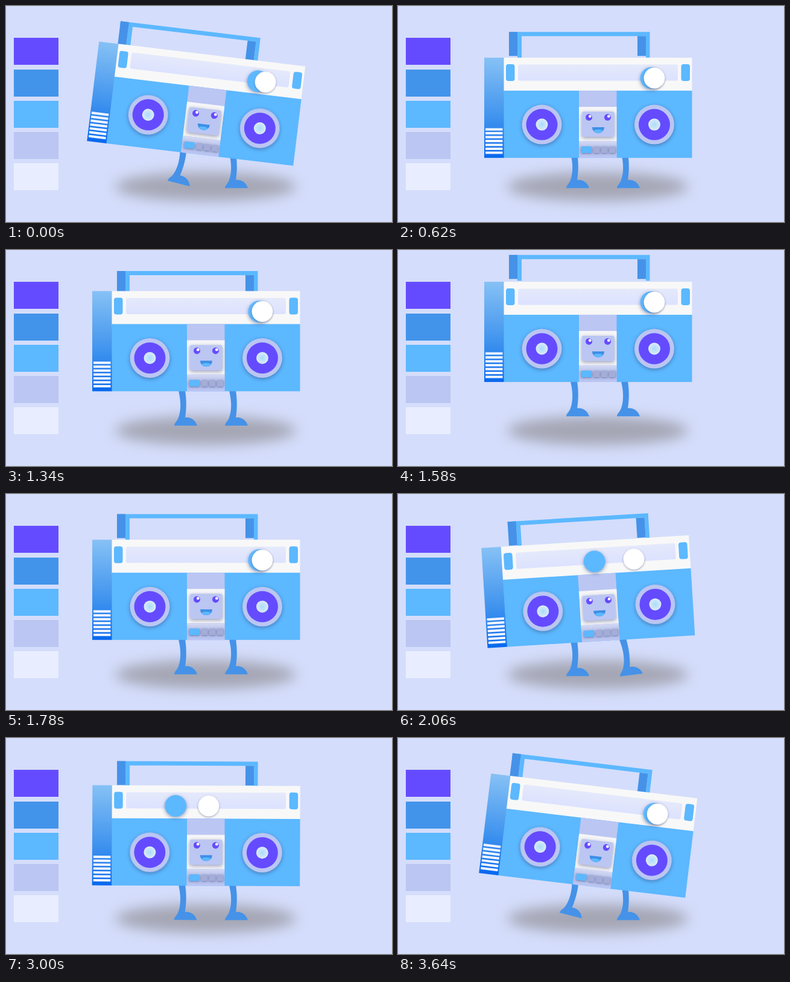
Write an HTML page that moves like this. It is 640 px wide and 360 px high and loops after 3.66 s.

```html
<!DOCTYPE html>
<html lang="en">
<head>
<meta charset="utf-8">
<title>Dancing boombox</title>
<style>
  html, body { margin: 0; width: 100%; height: 100%; overflow: hidden; background: #d4ddfb; }
  svg { display: block; width: 640px; height: 360px; }

  .move {
    animation-duration: 3660ms;
    animation-iteration-count: infinite;
    animation-timing-function: cubic-bezier(.37, 0, .63, 1);
  }
  #body { transform-origin: 315px 169.5px; animation-name: tilt, body-hop; }
  #handle { transform-origin: 301px 86px; animation-name: tilt, handle-hop; }
  #legs { animation-name: jump; }
  #left { transform-origin: 290px 250px; animation-name: left-step; }
  #right { transform-origin: 374px 250px; animation-name: right-step; }
  #blue { animation-name: blue-slide; }
  .white { animation-name: white-slide; }
  #over, #under { animation: swap 3660ms step-end infinite; }
  #under { animation-name: swap-back; }

  @keyframes tilt {
    0%, 1.64%, 88.52%, 100% { rotate: 6.9deg; }
    13.66%, 51.37% { rotate: 0deg; }
    61.2%, 75.14% { rotate: -7deg; }
  }
  @keyframes body-hop {
    0%, 12.3%, 32.24%, 32.79%, 50.55%, 100% { translate: 0 -6.75px; }
    19.67% { translate: 0 3px; }
    41.8% { translate: 0 -34.75px; }
  }
  @keyframes handle-hop {
    0%, 13.39%, 32.79%, 34.43%, 50.55%, 100% { translate: 0 -4px; }
    20.22% { translate: 0 4px; }
    43.72% { translate: 0 -35px; }
  }
  @keyframes jump {
    0%, 32.79%, 50.55%, 100% { translate: 0 0; }
    41.8% { translate: 0 -28px; }
  }
  @keyframes left-step {
    0%, 1.64%, 88.52%, 100% { translate: 1.5px -8px; rotate: 14deg; }
    13.66% { translate: 0 0; rotate: 0deg; }
    81.83% { translate: 0 0; rotate: 0deg; animation-timing-function: cubic-bezier(.39, .575, .565, 1); }
  }
  @keyframes right-step {
    0%, 51.37%, 81.83%, 100% { translate: 0 0; rotate: 0deg; }
    61.2% { translate: -3px -1px; rotate: -14deg; }
    75.14% { translate: -3px -1px; rotate: -14deg; animation-timing-function: cubic-bezier(.47, 0, .745, .715); }
  }
  @keyframes blue-slide {
    0% { translate: -12.4px 0; }
    10.93%, 51.37%, 90.16%, 100% { translate: -5.4px 0; }
    61.2%, 78.14% { translate: -185.5px 0; }
  }
  @keyframes white-slide {
    0%, 53.55%, 87.43%, 100% { translate: 0 0; }
    63.66%, 76.5% { translate: -180px 0; }
  }
  @keyframes swap {
    0%, 82.8%, 100% { opacity: 1; }
    56.5% { opacity: 0; }
  }
  @keyframes swap-back {
    0%, 82.8%, 100% { opacity: 0; }
    56.5% { opacity: 1; }
  }

  .sky { fill: #5cb8ff; }
  .mid { fill: #4592e8; }
  .lilac { fill: #bbc6f3; }
  .violet { fill: #654bff; }
  .raised { filter: drop-shadow(0 2px 3px rgba(40, 50, 100, .45)); }
  .key { filter: drop-shadow(0 1px 1.5px rgba(40, 50, 100, .5)); }
</style>
</head>
<body>
<svg viewBox="0 0 640 360">
  <defs>
    <linearGradient id="side" x2="0" y2="1">
      <stop offset="0" stop-color="#86c1f5"/>
      <stop offset=".6" stop-color="#3f93ee"/>
      <stop offset="1" stop-color="#0768ee"/>
    </linearGradient>
    <linearGradient id="dial" x2="0" y2="1">
      <stop offset="0" stop-color="#e5e9fb"/>
      <stop offset="1" stop-color="#dce2ff"/>
    </linearGradient>
    <linearGradient id="deck" x2="0" y2="1">
      <stop offset="0" stop-color="#d5dbf5"/>
      <stop offset=".5" stop-color="#b0b9e4"/>
      <stop offset="1" stop-color="#bbc6f3"/>
    </linearGradient>
    <radialGradient id="cone">
      <stop offset="0" stop-color="#a9dcfa"/>
      <stop offset="1" stop-color="#dcebf8"/>
    </radialGradient>
    <filter id="blur" x="-20%" y="-120%" width="140%" height="340%">
      <feGaussianBlur stdDeviation="11"/>
    </filter>
    <path id="leg" d="M284 238H296C299 255 300 272 297 290C306 289 314 294 317 303.5H279C279 299 284 296 286 290C291 276 290 258 284 238Z"/>
    <g id="speaker">
      <circle class="lilac raised" r="33"/>
      <circle class="violet" r="26"/>
      <circle r="10" fill="url(#cone)"/>
    </g>
    <g id="eye">
      <circle class="violet" r="5.5"/>
      <circle cx="1.8" cy="-1.8" r="2.4" fill="#fff"/>
    </g>
    <rect id="button" class="key" y="234" width="10.5" height="11" rx="1" fill="#a3add8"/>
    <circle id="cap" class="key" cx="425" cy="120" r="17.5" fill="#fff"/>
  </defs>

  <rect width="640" height="360" fill="#d4ddfb"/>
  <rect class="violet" x="13" y="53" width="74" height="45"/>
  <rect x="13" y="106" width="74" height="45" fill="#4294ea"/>
  <rect class="sky" x="13" y="158" width="74" height="45"/>
  <rect class="lilac" x="13" y="210" width="74" height="45"/>
  <rect x="13" y="262" width="74" height="45" fill="#e8eeff"/>

  <ellipse cx="331" cy="301" rx="150" ry="24" fill="#a4a6b4" filter="url(#blur)"/>

  <g id="legs" class="move mid">
    <g id="left" class="move"><use href="#leg"/></g>
    <g id="right" class="move"><use href="#leg" x="84"/></g>
  </g>

  <g id="handle" class="move">
    <path class="sky" d="M184 43H417.5V86H411V50H205V86H198V50H184Z"/>
    <path class="mid" d="M184 43H198V83H184ZM397 50H411V83H397Z"/>
  </g>

  <g id="body" class="move">
    <rect x="143" y="86" width="33" height="167" fill="url(#side)"/>
    <path d="M145 205.5H173.5" stroke="#eef4ff" stroke-width="4"/>
    <path d="M145 212H173.5M145 218.5H173.5M145 225H173.5M145 231.5H173.5M145 238H173.5M145 244.5H173.5" stroke="#eef4ff" stroke-width="4"/>
    <rect x="175.5" y="86" width="312" height="56" fill="#f8f8f8"/>
    <rect class="sky" x="175.5" y="141" width="312" height="112"/>
    <rect class="sky" x="179" y="97" width="14.5" height="28" rx="4"/>
    <rect class="sky" x="469.5" y="97" width="14.5" height="28" rx="4"/>
    <rect x="199" y="97.5" width="265" height="27" rx="3" fill="url(#dial)"/>

    <use href="#speaker" x="238.5" y="197.5"/>
    <use href="#speaker" x="425" y="197.5"/>

    <rect class="lilac" x="300" y="141" width="62.5" height="112"/>
    <rect x="300" y="168" width="62.5" height="57" fill="#f6f6f8"/>
    <rect x="300" y="225" width="62.5" height="28" fill="url(#deck)"/>
    <rect class="lilac raised" x="305" y="176" width="53.5" height="42" rx="3"/>
    <use href="#eye" x="316.5" y="185.5"/>
    <use href="#eye" x="347.5" y="185.5"/>
    <path d="M322 202H342C342 215 322 215 322 202Z" fill="#3d8fe6"/>
    <path class="sky" d="M324 208C328 205 336 205 340 208C336 213 328 213 324 208Z"/>
    <rect class="sky key" x="304" y="234" width="17" height="11" rx="1"/>
    <use href="#button" x="324"/>
    <use href="#button" x="337"/>
    <use href="#button" x="350"/>

    <g id="under"><g class="move white"><use href="#cap"/></g></g>
    <g id="blue" class="move"><circle class="sky raised" cx="425" cy="120" r="18"/></g>
    <g id="over"><g class="move white"><use href="#cap"/></g></g>
  </g>
</svg>
</body>
</html>
```
